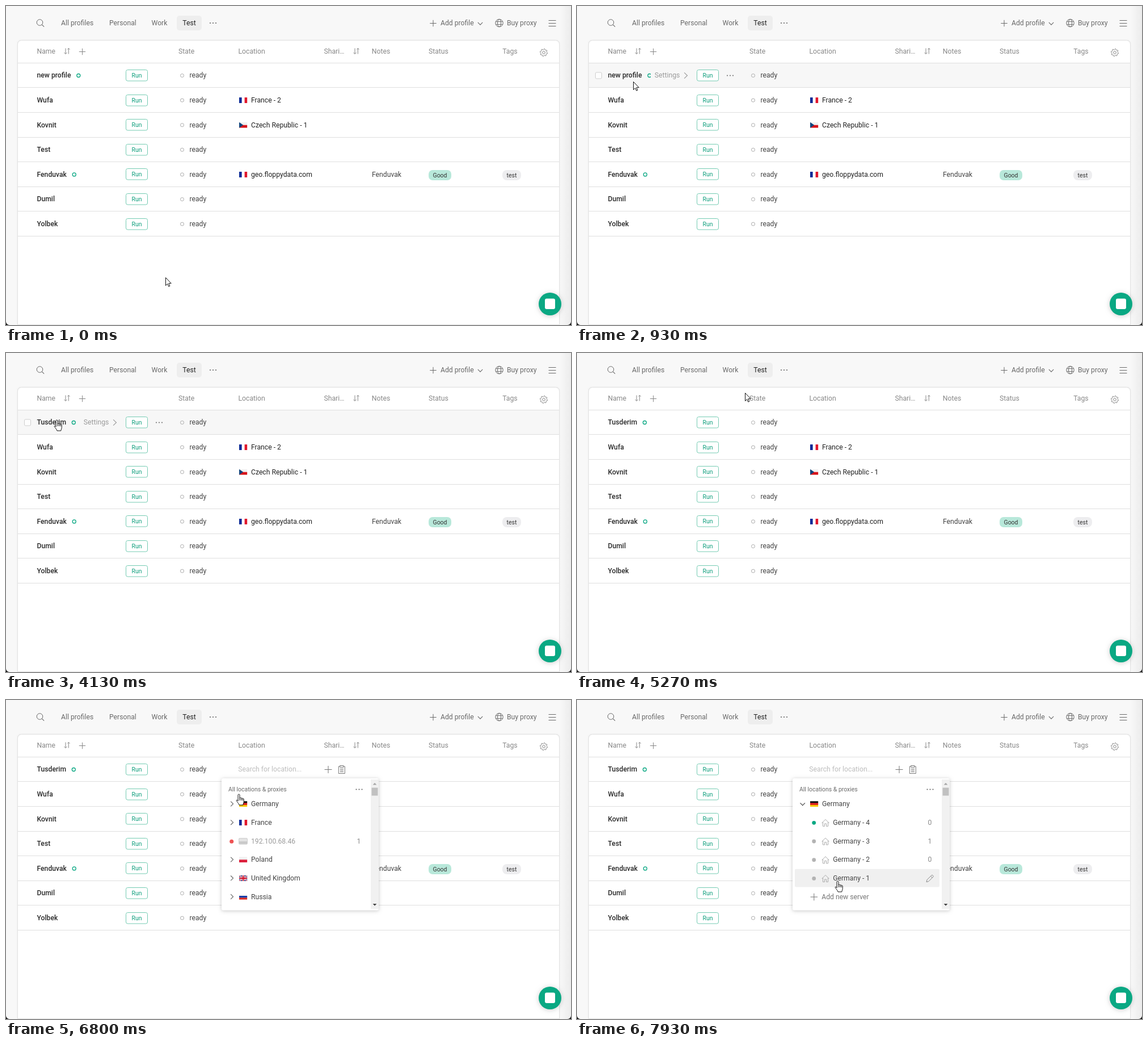
Animation of 996x562 px, one loop 8 s. Source, as an HTML page with a canvas:

```html
<!DOCTYPE html>
<html lang="en">
<head>
<title>Profile manager</title>
<style>
html, body { margin: 0; width: 100%; height: 100%; overflow: hidden; background: #f8f8f8; }
canvas { display: block; width: 996px; height: 562px; }
</style>
</head>
<body>
<canvas id="stage"></canvas>
<script>
const W = 996, H = 562, LOOP = 8000, STEP = 1000 / 15;
const canvas = document.getElementById('stage');
const ctx = canvas.getContext('2d');
const dpr = window.devicePixelRatio || 1;
canvas.width = W * dpr;
canvas.height = H * dpr;

const GREEN = '#0aa883', HOVER = '#f7f7f7', GREY = '#888';
const NEW_NAME = 'Tusderim';
const KEYS = [35, 39, 40, 42, 47, 53, 55, 56];   // steps at which a letter is typed
const EDIT = 21, COMMIT = 60, OPEN = 90, EXPAND = 109;

const ROWS = [
  { name: 'new profile', dot: true },
  { name: 'Wufa', flag: 'fr', loc: 'France - 2' },
  { name: 'Kovnit', flag: 'cz', loc: 'Czech Republic - 1' },
  { name: 'Test' },
  { name: 'Fenduvak', dot: true, flag: 'fr', loc: 'geo.floppydata.com', note: 'Fenduvak', status: 'Good', tag: 'test' },
  { name: 'Dumil' },
  { name: 'Yolbek' }
];
const PLACES = [['Germany', 'de'], ['France', 'fr'], ['192.100.68.46', 'host'],
  ['Poland', 'pl'], ['United Kingdom', 'uk'], ['Russia', 'ru']];

// start step, end step, target, optional bend point
const MOVES = [
  [1, 14, 99, 133], [14, 22, 90, 118], [60, 62, 89, 117],
  [72, 84, 451, 112, 230, 21], [97, 104, 400, 178], [112, 119, 459, 318]
];

const HAND = new Path2D('M4 13V2.5a1.5 1.5 0 0 1 3 0V8a1.4 1.4 0 0 1 2.7.4 1.3 1.3 0 0 1 2.4.7 1.2 1.2 0 0 1 2.1.9v4.5c0 2-1.2 3-1.4 5.5H6c-.3-2.5-3-4.5-4.7-7.5-.7-1.4 1-2.3 2.7.5z');
const KNUCKLES = new Path2D('M7 8v4M9.7 8.5v3.5M12.1 9.2v3');
const ARROW = new Path2D('M.5.5v14l3.2-3 2 4.7 2.1-.9-2-4.6h4.4z');
const BEAM = new Path2D('M-3-7h2.2l.8.7.8-.7H3M0-6.5v13M-3 7.5h2.2l.8-.8.8.8H3');
const HOUSE = new Path2D('M-6.5.5L0-6 6.5.5M-4.5-1.3V6h3V1.5h3V6h3V-1.3');
const PENCIL = new Path2D('M-6 6l1-3.8 8-8q1-.8 2 0l.8.8q.8 1 0 2l-8 8zM1.5-4.3l2.8 2.8');
const CLIP = new Path2D('M-3-5.5h-2.5V7h11V-5.5H3M-3-7h6v3h-6zM-3-1h6M-3 1.5h6M-3 4h6');
const SORT = new Path2D('M-2.5-5V5M-5 2.5L-2.5 5 0 2.5M2.8 5V-5M.8-3L2.8-5 5-3');

function text(s, x, mid, color, size = 12.2, weight = 400, align = 'left') {
  ctx.font = `${weight} ${size}px Roboto, "Open Sans", sans-serif`;
  ctx.textAlign = align;
  ctx.fillStyle = color;
  ctx.fillText(s, x, mid + size * 0.355);
  return ctx.measureText(s).width;
}

function box(x, y, w, h, r, fill, stroke) {
  ctx.beginPath();
  ctx.roundRect(x, y, w, h, r);
  if (fill) { ctx.fillStyle = fill; ctx.fill(); }
  if (stroke) { ctx.strokeStyle = stroke; ctx.lineWidth = 1; ctx.stroke(); }
}

function rect(x, y, w, h, fill) {
  ctx.fillStyle = fill;
  ctx.fillRect(x, y, w, h);
}

function disc(x, y, r, fill, stroke, width = 1) {
  ctx.beginPath();
  ctx.arc(x, y, r, 0, 7);
  if (fill) { ctx.fillStyle = fill; ctx.fill(); }
  if (stroke) { ctx.strokeStyle = stroke; ctx.lineWidth = width; ctx.stroke(); }
}

function line(color, width, ...pts) {
  ctx.beginPath();
  for (let i = 0; i < pts.length; i += 2) ctx.lineTo(pts[i], pts[i + 1]);
  ctx.strokeStyle = color;
  ctx.lineWidth = width;
  ctx.stroke();
}

function icon(path, x, y, stroke, width = 1, fill) {
  ctx.save();
  ctx.translate(x, y);
  if (fill) { ctx.fillStyle = fill; ctx.fill(path); }
  ctx.strokeStyle = stroke;
  ctx.lineWidth = width;
  ctx.stroke(path);
  ctx.restore();
}

function plus(x, y, r, color) {
  line(color, 1, x - r, y, x + r, y);
  line(color, 1, x, y - r, x, y + r);
}

function dots(x, y, gap, color) {
  for (let i = -1; i < 2; i++) disc(x + i * gap, y, 1.1, color);
}

const chevronRight = (x, y, w, h, c) => line(c, 1.1, x - w, y - h, x + w, y, x - w, y + h);
const chevronDown = (x, y, w, h, c) => line(c, 1.1, x - w, y - h, x, y + h, x + w, y - h);

function flag(kind, mid) {
  const x = 411, y = mid - 5, w = 14.4, h = 10;
  const bands = (colors, upright) => colors.forEach((c, i) => {
    const n = colors.length;
    if (upright) rect(x + w * i / n, y, w / n, h, c);
    else rect(x, y + h * i / n, w, h / n, c);
  });
  ctx.save();
  ctx.beginPath();
  ctx.rect(x, y, w, h);
  ctx.clip();
  if (kind === 'fr') bands(['#0a2896', '#fff', '#e0162b'], true);
  if (kind === 'de') bands(['#000', '#dd1111', '#f8c800']);
  if (kind === 'pl') bands(['#f1f1f1', '#dc1f3c']);
  if (kind === 'ru') bands(['#f4f4f4', '#1239a5', '#d6231c']);
  if (kind === 'cz') {
    bands(['#f1f1f1', '#d7141a']);
    ctx.beginPath();
    ctx.moveTo(x, y);
    ctx.lineTo(x + 7.2, y + 5);
    ctx.lineTo(x, y + 10);
    ctx.fillStyle = '#11457e';
    ctx.fill();
  }
  if (kind === 'uk') {
    bands(['#1b2f7d']);
    for (const [c, d, s] of [['#fff', 2, 3.6], ['#d2142c', .8, 2]]) {
      line(c, d, x, y, x + w, y + h);
      line(c, d, x + w, y, x, y + h);
      line(c, s, x, y + 5, x + w, y + 5);
      line(c, s, x + 7.2, y, x + 7.2, y + h);
    }
  }
  ctx.restore();
  if (kind === 'host') {
    box(410.5, y, 15, 10.5, 1.5, '#e3e3e3', '#cfcfcf');
    rect(411, y + 5.5, 14, 4.5, '#c9c9c9');
  }
}

function gear(x, y) {
  ctx.beginPath();
  for (let i = 0; i < 32; i++) {
    const a = (i + .5) * Math.PI / 16, r = i % 4 < 2 ? 6.6 : 5.1;
    ctx.lineTo(x + r * Math.cos(a), y + r * Math.sin(a));
  }
  ctx.closePath();
  ctx.strokeStyle = GREY;
  ctx.lineWidth = 1;
  ctx.stroke();
  disc(x, y, 2.3, null, GREY);
}

function shadow(color, blur, dy, draw) {
  ctx.save();
  ctx.shadowColor = color;
  ctx.shadowBlur = blur * dpr;
  ctx.shadowOffsetY = dy * dpr;
  draw();
  ctx.restore();
}

function toolbar() {
  const c = '#6a6a6a';
  disc(59.5, 29, 5.3, null, c);
  line(c, 1.1, 63.3, 32.8, 67.2, 36.7);
  text('All profiles', 97, 30, c);
  text('Personal', 182, 30, c);
  text('Work', 256.5, 30, c);
  box(301, 17, 44, 26, 5, '#eeeeee');
  text('Test', 323, 30, '#222', 12.2, 400, 'center');
  dots(365, 30, 5, c);
  plus(753, 30.5, 5.7, c);
  text('Add profile', 766, 30, c);
  chevronDown(836, 31, 4.2, 2.2, c);
  disc(869.5, 30, 6.7, null, c);
  ctx.beginPath();
  ctx.ellipse(869.5, 30, 3, 6.7, 0, 0, 7);
  ctx.stroke();
  line(c, .9, 863.4, 27.5, 875.6, 27.5);
  line(c, .9, 863.4, 32.5, 875.6, 32.5);
  text('Buy proxy', 883, 30, c);
  for (const y of [25.5, 30.5, 35.5]) line(c, 1, 956.5, y, 969.5, y);
}

function header() {
  const heads = [['Name', 54.5], ['State', 304], ['Location', 409.5], ['Shari\u2026', 560.5],
    ['Notes', 644.8], ['Status', 745], ['Tags', 875.2]];
  for (const [s, x] of heads) text(s, x, 80, GREY);
  icon(SORT, 107.5, 79.5, GREY);
  icon(SORT, 617.5, 79.5, GREY);
  plus(134.5, 80.5, 5.7, GREY);
  gear(948, 82);
}

function nameCell(row, i, mid, s) {
  const k = s.k;
  if (i === 0 && k >= EDIT && k < COMMIT) {
    const n = KEYS.filter(key => k >= key).length;
    if (!n) {
      rect(54.5, 114, 60.5, 17, '#0078d7');
      text(row.name, 54.5, mid, '#fff');
    } else {
      const w = text(NEW_NAME.slice(0, n), 54.5, mid, '#333');
      rect(Math.round(54.5 + w), 115, 1, 14, '#222');
    }
    return;
  }
  const name = i === 0 && k >= COMMIT ? NEW_NAME : row.name;
  const w = text(name, 54.5, mid, '#2a2a2a', 12.2, 500);
  if (row.dot) disc(54.5 + w + 13.3, mid + .5, 3, null, GREEN, 1.3);
  if (s.row === i && s.x < 205) {
    rect(130, mid - 15, 70, 30, HOVER);
    text('Settings', 136.8, mid, '#9a9a9a');
    chevronRight(191.8, mid + .5, 2.7, 5.2, '#999');
  }
}

function tableRow(row, i, s) {
  const top = Math.floor(100.4 + 43.55 * i), mid = 122 + 43.6 * i;
  const over = s.row === i;
  if (over) {
    rect(21, top + 1, 954, 43, HOVER);
    box(32.5, mid - 5, 11, 11, 2, '#fdfdfd', '#cfcfcf');
    dots(270, mid + .5, 5, '#777');
  }
  nameCell(row, i, mid, s);
  const y = Math.round(mid) - 9.5;
  box(211.5, y, 38, 19.5, 3, '#fff', '#74cbb2');
  text('Run', 230.6, mid + .3, '#0a9d7a', 10.46, 400, 'center');
  disc(310.5, mid + .5, 3, null, '#aaa');
  text('ready', 323.5, mid, '#444');
  if (row.loc) {
    flag(row.flag, mid + .5);
    text(row.loc, 432, mid, '#222');
  }
  if (row.note) text(row.note, 645, mid, '#444');
  if (row.status) {
    box(745, 289, 40, 18, 7, '#b8e8da');
    text(row.status, 765, 298, '#333', 10.46, 400, 'center');
  }
  if (row.tag) {
    box(875, 289, 33, 18, 8, '#ededef');
    text(row.tag, 891.5, 298, '#333', 10.46, 400, 'center');
  }
  if (i === 0 && (s.k >= OPEN || over && s.x > 400 && s.x < 600)) {
    text('Search for location...', 409.3, mid, '#bdbdbd');
    plus(568, 122.5, 6.5, '#777');
    icon(CLIP, 591.8, 122.5, '#777');
    const lit = s.k >= OPEN && s.k < 98 || s.k >= 106 && s.k < EXPAND;
    if (lit) rect(409, 116, 1, 13, '#222');
  }
}

function popup(s) {
  shadow('rgba(0,0,0,.22)', 6, 1, () => box(380, 138, 277, 232.5, 3, '#fff'));
  text('All locations & proxies', 392, 157.5, '#6a6a6a', 10.46);
  dots(622.5, 157.5, 5, '#666');
  rect(643, 140, 14, 228, '#f1f1f1');
  rect(644.5, 154.5, 11, 14, '#c1c1c1');
  for (const [y, d, c] of [[148, -1, '#a3a3a3'], [360.5, 1, '#404040']]) {
    ctx.beginPath();
    ctx.moveTo(646.6, y - d * 1.5);
    ctx.lineTo(653.4, y - d * 1.5);
    ctx.lineTo(650, y + d * 2);
    ctx.fillStyle = c;
    ctx.fill();
  }
  const open = s.k >= EXPAND;
  for (let i = 0; i < 6; i++) {
    const mid = 183 + 32.7 * i, over = s.item === i;
    if (over) box(384, mid - 16, 255, 31.8, 2, '#f0f0f0');
    if (open && i) child(i, mid, over);
    else place(i, mid, over, open, s);
  }
}

function place(i, mid, over, open, s) {
  const [name, kind] = PLACES[i];
  flag(kind, mid + .2);
  if (kind === 'host') {
    disc(397.7, mid + .8, 3.5, '#ee5253');
    text(name, 432, mid, '#9a9a9a');
    text('1', 622, mid, GREY, 12.2, 400, 'center');
    return;
  }
  if (over && s.x < 408) box(389, mid - 9, 17.5, 18.5, 3, '#e4e4e4');
  if (open) chevronDown(397.7, mid + .5, 4.2, 2.2, '#444');
  else chevronRight(398.3, mid, 2.2, 4.3, '#666');
  text(name, 432, mid, '#444');
  if (over) text('View available servers', 629, mid, '#777', 10.46, 400, 'right');
}

function child(i, mid, over) {
  if (i === 5) {
    plus(417.8, mid + .5, 6.3, '#777');
    text('Add new server', 431.2, mid, '#777');
    return;
  }
  disc(417.7, mid + .6, 3.4, i === 1 ? GREEN : '#b3b3b3');
  icon(HOUSE, 438, mid + .7, '#aaa');
  text('Germany - ' + (5 - i), 451.2, mid, '#444');
  if (over) icon(PENCIL, 622, mid + .8, GREY);
  else text(i % 2 ? '0' : '1', 622, mid, GREY, 12.2, 400, 'center');
}

function pointerAt(k) {
  let x = 281, y = 478;
  for (const [a, b, tx, ty, bx = (x + tx) / 2, by = (y + ty) / 2] of MOVES) {
    if (k <= a) break;
    const p = Math.min(1, (k - a) / (b - a)), e = p * p * (3 - 2 * p), u = 1 - e;
    x = u * u * x + 2 * u * e * bx + e * e * tx;
    y = u * u * y + 2 * u * e * by + e * e * ty;
    if (p < 1) break;
  }
  return [Math.round(x), Math.round(y)];
}

function stateAt(k) {
  const [x, y] = pointerAt(k);
  const inside = k >= OPEN && x > 380 && x < 657 && y > 138 && y < 371;
  const row = inside ? -1 : Math.floor((y - 100.4) / 43.55);
  const item = inside && x < 640 ? Math.floor((y - 167) / 32.7) : -1;
  return { k, x, y, row, item, inside };
}

function cursor(s) {
  const onName = s.x > 54 && s.x < 115 && Math.abs(s.y - 122 - 43.6 * s.row) < 9;
  const onCell = s.x > 380 && s.x < 555;
  if (s.k >= EDIT && s.k < 62) icon(BEAM, s.x + .5, s.y + .5, '#111');
  else if (s.inside || s.row >= 0 && s.row < 7 && (onName || onCell)) {
    icon(HAND, s.x - 5, s.y, '#111', 1, '#fff');
    icon(KNUCKLES, s.x - 5, s.y, '#111');
  } else icon(ARROW, s.x, s.y, '#111', 1, '#fff');
}

function chatButton() {
  shadow('rgba(0,0,0,.2)', 8, 1, () => disc(959, 525, 20, GREEN));
  box(950, 515.5, 18, 18.5, 3, '#fff');
}

function corners() {
  ctx.beginPath();
  ctx.rect(0, 550, W, 12);
  ctx.roundRect(0, 530, W, 32, [0, 0, 6, 6]);
  ctx.rect(0, 530, W, 20);
  ctx.fillStyle = '#111';
  ctx.fill('evenodd');
}

function draw(t) {
  const s = stateAt(Math.floor((t + 5) / STEP));
  ctx.setTransform(dpr, 0, 0, dpr, 0, 0);
  rect(0, 0, W, H, '#f8f8f8');
  toolbar();
  shadow('rgba(0,0,0,.12)', 3, 0, () => box(21, 61, 954, 500, [6, 6, 0, 0], '#fff'));
  box(20.5, 60.5, 955, 501, [6, 6, 0, 0], null, '#e2e2e2');
  header();
  ROWS.forEach((row, i) => tableRow(row, i, s));
  for (let i = 0; i < 8; i++) rect(21, Math.floor(100.4 + 43.55 * i), 954, 1, '#dfdfdf');
  const edge = ctx.createLinearGradient(976, 0, W, 0);
  edge.addColorStop(0, 'rgba(0,0,0,0)');
  edge.addColorStop(1, 'rgba(0,0,0,.05)');
  rect(976, 0, 20, H, edge);
  if (s.k >= OPEN) popup(s);
  chatButton();
  corners();
  cursor(s);
}

let start = null;
function tick(now) {
  if (start === null) start = now;
  draw((now - start) % LOOP);
  requestAnimationFrame(tick);
}
draw(0);
requestAnimationFrame(tick);
</script>
</body>
</html>
```
